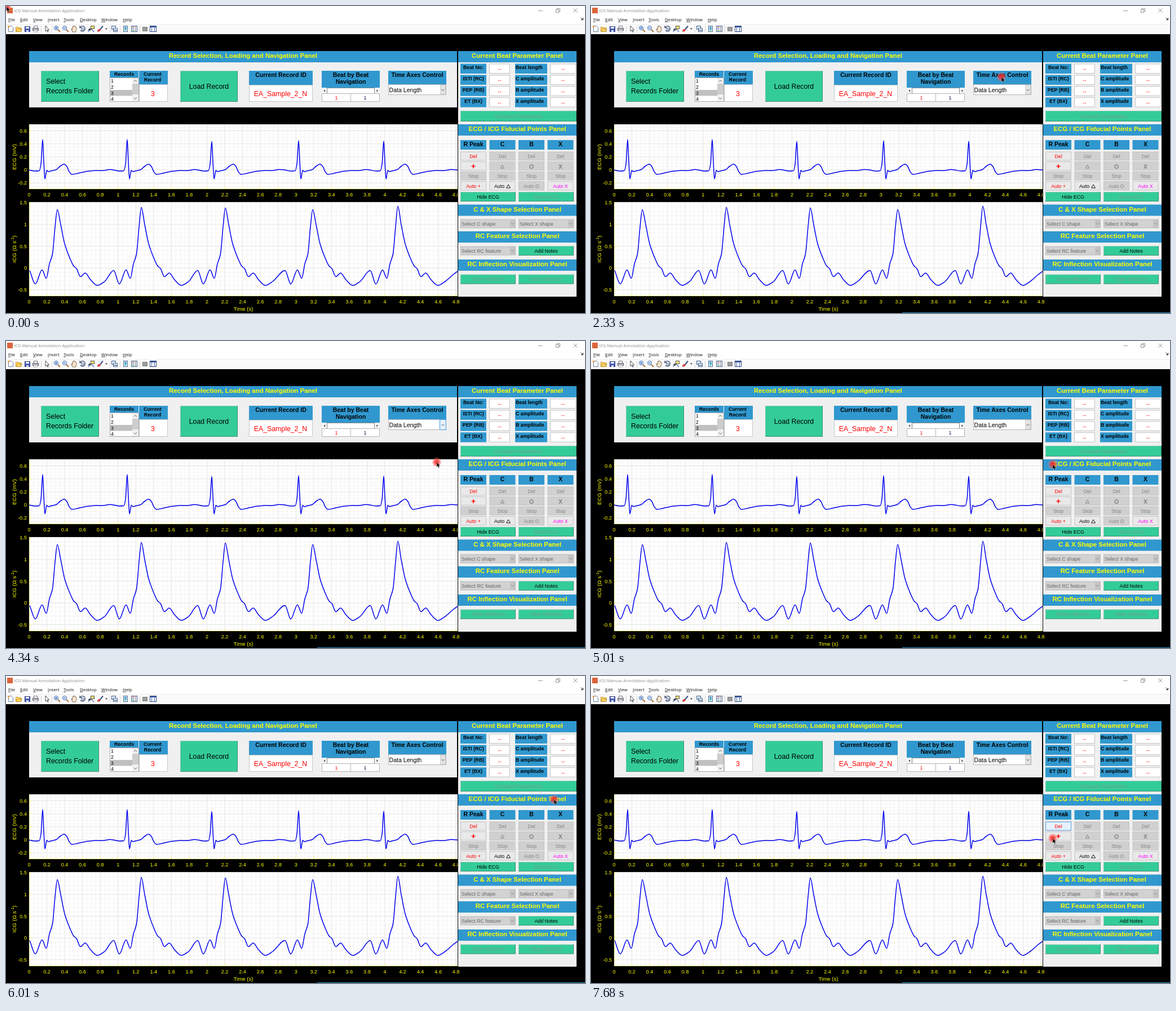
These frames come from a looping animation (1027x545 px, 8 s). An HTML page:

```html
<!DOCTYPE html>
<html lang="en">
<head>
<meta charset="utf-8">
<title>ICG Manual Annotation Application</title>
<style>
html, body { margin: 0; width: 100%; height: 100%; overflow: hidden; background: #000; }
svg { display: block; width: 1027px; height: 545px; }
text { font-family: "Liberation Sans", Arial, sans-serif; white-space: pre; }
.ui { font-family: "Open Sans", "Noto Sans", sans-serif; }
</style>
</head>
<body>
<svg id="stage" viewBox="0 0 1027 545" xmlns="http://www.w3.org/2000/svg"></svg>
<script>
const BLUE = '#3098cf', GREEN = '#33cc99', GRAY = '#f0f0f0', YELLOW = '#ffff00';
const RED = '#ff0000', DIM = '#838383', DIM_ON_GREEN = '#6f9f8b';
const out = [];
const add = s => out.push(s);

function rect(x1, y1, x2, y2, fill, extra = '') {
  add(`<rect x="${x1}" y="${y1}" width="${x2 - x1}" height="${y2 - y1}" fill="${fill}" ${extra}/>`);
}
function box(x1, y1, x2, y2, fill, stroke, extra = '') {
  rect(x1 + .5, y1 + .5, x2 - .5, y2 - .5, fill, `stroke="${stroke}" ${extra}`);
}
function path(d, stroke, width = 1, fill = 'none', extra = '') {
  add(`<path d="${d}" stroke="${stroke}" stroke-width="${width}" fill="${fill}" ${extra}/>`);
}
// y is the vertical middle of the capitals
function text(x, y, s, size, fill = '#000', anchor = 'middle', extra = '') {
  add(`<text x="${x}" y="${y + size * .36}" font-size="${size}" fill="${fill}" text-anchor="${anchor}" ${extra}>${s}</text>`);
}
const bold = (x, y, s, size, fill = '#000', anchor = 'middle') =>
  text(x, y, s, size, fill, anchor, 'font-weight="700"');

function button(x1, y1, x2, y2, label, color = '#000', fill = GREEN, size = 8.8) {
  box(x1, y1, x2, y2, fill, fill === GREEN ? '#7fc9ad' : '#c4c4c4');
  if (fill === GREEN) path(`M${x1} ${y2 - .5}H${x2 - .5}V${y1}`, '#3f8f74');
  if (label) text((x1 + x2) / 2, (y1 + y2) / 2, label, size, color);
}
function chevron(x, y, dir, color = '#555') {
  path(`M${x - 2.6} ${y - 1.3 * dir}L${x} ${y + 1.3 * dir}L${x + 2.6} ${y - 1.3 * dir}`, color);
}

/* window frame */
function menuBar() {
  rect(0, 0, 1027, 50, '#fff');
  rect(0, 32, 1027, 50, '#fafafa');
  path('M0 32.5H1027', '#ececec');
  rect(2, 3, 12, 13, '#d9653b');
  text(14, 8, 'ICG Manual Annotation Application', 7.7, '#8a8a8a', 'start', 'class="ui"');
  const menus = { File: 4, Edit: 25, View: 48, Insert: 74, Tools: 102, Desktop: 131, Window: 169, Help: 207 };
  for (const [name, x] of Object.entries(menus))
    text(x, 24, `<tspan text-decoration="underline">${name[0]}</tspan>${name.slice(1)}`, 7.7, '#111', 'start', 'class="ui"');
  path('M944 8.5H952M975.5 6.5H980.5V11.5H975.5ZM977 6V4.5H982.5V10H981M1006.5 4.5L1013.5 11.5M1013.5 4.5L1006.5 11.5', '#8c8c8c', .9);
  path('M1019.5 20.5L1023 24M1023.5 21V24.5H1020', '#222', 1);
}

function toolBar() {
  for (const x of [62, 81, 184, 202, 237]) path(`M${x}.5 35V47`, '#d4d4d4');
  path('M4.5 35.5H9.5L12.5 38.5V45.5H4.5Z', '#6a7f9b', 1, '#fff');
  rect(3, 35, 6, 38, '#f0a030');
  path('M17.5 45.5V37.5H21L22.5 38.5H26.5V45.5ZM17.5 45.5L20 40.5H28L26.5 45.5Z', '#b98a20', .8, '#ffd766');
  box(33, 36, 43, 46, '#4a5fb5', '#2b3a80');
  rect(35, 37, 41, 40, '#fff');
  rect(36, 43, 40, 46, '#d5d9ee');
  path('M49.5 39V35.5H55.5V39', '#777', 1, '#fff');
  box(47, 39, 58, 44, '#b9bcc2', '#5b5f68');
  rect(49, 43, 56, 46, '#fff', 'stroke="#777" stroke-width=".6"');
  path('M70 35V45L72.3 42.8L74 46.3L75.2 45.7L73.6 42.4H76.5Z', '#222', .8, '#fff');
  for (const [x, mark] of [[89, 'M87 39H91M89 37V41'], [104, 'M102 39H106']]) {
    path(`M${x + 3} 42L${x + 7} 46`, '#a9712f', 2);
    add(`<circle cx="${x}" cy="39" r="3.6" fill="#e2efff" stroke="#4a6fb0"/>`);
    path(mark, '#2454b0');
  }
  path('M118 46C117 43 115 41 116 40.3L118 42V37Q119 36 119.6 37V35.5Q120.6 34.6 121.4 35.5V36.4Q122.4 35.6 123.2 36.6V38Q124.5 37.4 125 38.5C125 42 124.5 43 123.5 46Z', '#5c4a36', .8, '#ffe8cf');
  path('M132 37.5A4.6 4.6 0 1 1 132 43M131 35V38.6H135', '#3b4d70', 1.3);
  path('M134 40L136 38.8L138.4 40V42.4L136 43.4L134 42.4Z', '#3b4d70', .7, '#cfd9ea');
  path('M146 46C147 40 149 38 156 46', '#3157a8', 1.2);
  box(150, 35, 157, 41, '#f4e66d', '#555');
  path('M146 42H151M148.5 39.5V44.5', '#222');
  path('M162 45Q163 41 166 41L168 43Q166 46 162 45Z', '#c03030', .6, '#e04848');
  path('M167 41.5L172 35.5', '#35508f', 2);
  path('M176 39.5H180L178 42Z', 'none', 0, '#333');
  box(187, 35, 195, 42, '#dfe9f6', '#46648f');
  box(190, 39, 198, 46, '#fff', '#46648f');
  path('M191 43H197', '#46648f', 1.5);
  box(208, 35, 216, 46, '#fff', '#46648f');
  rect(210, 37, 214, 44, 'url(#bar)');
  box(222, 35, 233, 46, '#fff', '#46648f');
  for (const [y, c] of [[38, '#d33'], [41, '#36c'], [44, '#393']]) {
    path(`M224 ${y - .5}H227`, c, 1.4);
    path(`M228 ${y - .5}H231`, '#666', 1);
  }
  box(242, 37, 251, 45, '#9b9b9b', '#858585');
  box(255, 35, 267, 46, '#fff', '#2d4478');
  rect(256, 36, 266, 38, '#3c5fa5');
  path('M258.5 38V45M263.5 38V45', '#3c5fa5');
}

/* charts */
// smooth curve without overshoot through points sorted by x
function curve(pts) {
  const n = pts.length, slope = [], m = [];
  for (let i = 0; i < n - 1; i++)
    slope.push((pts[i + 1][1] - pts[i][1]) / (pts[i + 1][0] - pts[i][0]));
  for (let i = 0; i < n; i++) {
    const a = slope[i - 1], b = slope[i];
    m.push(a === undefined ? b : b === undefined ? a : a * b <= 0 ? 0 : 2 * a * b / (a + b));
  }
  let d = `M${pts[0]}`;
  for (let i = 0; i < n - 1; i++) {
    const [x, y] = pts[i], [u, v] = pts[i + 1], h = (u - x) / 3;
    d += `C${x + h} ${y + m[i] * h} ${u - h} ${v - m[i + 1] * h} ${u} ${v}`;
  }
  return d;
}
const beats = (peaks, shape) =>
  peaks.flatMap(([px, py]) => shape.map(([dx, y]) => [px + dx, dx === 0 ? py : y]));

const X0 = 41, PER_SEC = 157.75, LEFT = 41, RIGHT = 801;

function plot(top, bottom, zero, perUnit, yStep, yMinor, yLabels, labelY) {
  rect(LEFT, top, RIGHT, bottom, '#fff');
  let minor = '', major = '', ticks = '';
  for (let i = 1; i * .05 * PER_SEC < RIGHT - X0; i++) {
    const x = X0 + i * .05 * PER_SEC;
    if (i % 4) minor += `M${x} ${top}V${bottom}`;
    else {
      major += `M${x} ${top}V${bottom}`;
      ticks += `M${x} ${bottom}v-5`;
    }
  }
  const perMajor = Math.round(yStep / yMinor);
  for (let i = -30; i < 30; i++) {
    const y = zero - i * yMinor * perUnit;
    if (y <= top || y >= bottom) continue;
    if (i % perMajor) minor += `M${LEFT} ${y}H${RIGHT}`;
    else {
      major += `M${LEFT} ${y}H${RIGHT}`;
      ticks += `M${LEFT} ${y}h6`;
    }
  }
  path(minor, '#dcdcdc', .7, 'none', 'stroke-dasharray="1 1.4"');
  path(major, '#e0e0e0', .9);
  path(ticks + `M${LEFT + .4} ${top}V${bottom - .4}H${RIGHT}`, '#f6f68a', .9);
  for (let i = 0; i <= 24; i++)
    text(X0 + i * .2 * PER_SEC, labelY, String(+(i * .2).toFixed(1)), 9.1, YELLOW);
  for (const v of yLabels) text(37, zero - v * perUnit, String(v), 9.1, YELLOW, 'end');
}

function charts() {
  plot(210, 325, 291, 115.8, .2, .05, [.6, .4, .2, 0, -.2], 335);
  plot(348, 515, 465, 77.3, .5, .1, [1.5, 1, .5, 0, -.5], 525);
  text(0, 0, 'ECG (mV)', 9.9, YELLOW, 'middle', 'transform="translate(14 268) rotate(-90)"');
  text(0, 0, 'ICG (Ω s<tspan dy="-4" font-size="7">-1</tspan><tspan dy="4">)</tspan>', 9.9, YELLOW, 'middle',
    'transform="translate(14 431.5) rotate(-90)"');
  text(421, 537.5, 'Time (s)', 9.7, YELLOW);

  const ecg = beats([[65, 237], [215, 237], [365, 240.5], [519, 239], [670, 240]], [
    [-25, 291], [-14, 293], [-6, 292.5], [-3, 281], [0, 0], [2, 276], [4, 307], [7.2, 291.8], [10, 294],
    [15, 292.8], [24, 290.5], [31, 284.5], [38, 280.8], [43, 285], [47, 294], [52, 299], [62, 297.2],
    [76, 294], [95, 292], [106, 292.3], [120, 290.2]
  ]);
  path(curve([...ecg, [801, 291]]), '#0000ee', 1.5, 'none', 'clip-path="url(#plots)"');

  const icg = beats([[91, 361.5], [240, 357.5], [389, 358.5], [544, 361.5], [695, 355.5]], [
    [-49, 469.5], [-39, 493.5], [-27, 468.5], [-19.5, 483.5], [-14, 458], [-8.5, 440], [-4, 392], [0, 0], [6, 388],
    [13, 422], [22, 447], [29, 461.5], [34, 466], [41, 480.5], [49.5, 474], [59, 486], [71, 496], [84, 489]
  ]);
  path(curve([...icg, [793, 477], [801, 471]]), '#0000ee', 1.5, 'none', 'clip-path="url(#plots)" stroke-linejoin="round"');
}

/* panels */
function header(x1, x2, y, title) {
  rect(x1, y, x2, y + 20, BLUE);
  bold((x1 + x2) / 2, y + 8, title, 11.45, YELLOW);
}

function recordPanel() {
  rect(41, 80, 800, 180, GRAY);
  header(41, 800, 80, 'Record Selection, Loading and Navigation Panel');
  button(62, 115, 165, 170);
  text(71, 134, 'Select', 12.3, '#000', 'start');
  text(71, 150.5, 'Records Folder', 12.3, '#000', 'start');
  button(309, 115, 411, 170, 'Load Record', '#000', GREEN, 12.3);

  rect(184, 115, 235, 127, BLUE);
  bold(209.5, 121, 'Records', 8.8);
  box(184, 127, 236, 170, '#fff', '#a8a8a8');
  rect(185, 149, 224, 159.5, '#c0c0c0');
  ['1', '2', '3', '4'].forEach((s, i) => text(186, 133.2 + i * 10.7, s, 8.8, '#000', 'start'));
  rect(224, 128, 235, 169, '#f0f0f0');
  rect(224, 138, 235, 157, '#cdcdcd');
  chevron(229.5, 133, -1);
  chevron(229.5, 164, 1);
  rect(236, 115, 287, 140, BLUE);
  bold(260, 121, 'Current', 8.8);
  bold(260, 131, 'Record', 8.8);
  box(236, 139, 287, 170, '#fff', '#c8c8c8');
  text(260.5, 155.5, '3', 12.3, RED);

  rect(431, 115, 544, 140, BLUE);
  bold(487.5, 122, 'Current Record ID', 10.5);
  box(431, 140, 544, 170, '#fff', '#c8c8c8');
  text(487, 155.5, 'EA_Sample_2_N', 12.3, RED);

  rect(560, 115, 663, 145, BLUE);
  bold(611.5, 122, 'Beat by Beat', 10.5);
  bold(611.5, 134.5, 'Navigation', 10.5);
  rect(560, 145, 663, 156, '#f4f4f4');
  box(569, 145, 654, 156, '#fff', '#888');
  path('M566 148.5V152.5L563.5 150.5ZM657.5 148.5V152.5L660 150.5Z', 'none', 0, '#333');
  box(560, 155, 612, 170, '#fff', '#b5b5b5');
  box(611, 155, 663, 170, '#fff', '#b5b5b5');
  text(586, 162.5, '1', 8.8, RED);
  text(637, 162.5, '1', 8.8, '#000050');

  rect(678, 115, 781, 140, BLUE);
  bold(729.5, 122, 'Time Axes Control', 10.5);
  box(678, 139, 781, 158, '#fff', '#b5b5b5');
  box(770, 140, 780, 157, '#e4e4e4', '#cfcfcf');
  box(769, 139, 781, 158, '#e5f1fb', '#4a9be0', 'id="comboHover"');
  chevron(775, 149, 1);
  text(679.5, 149, 'Data Length', 10.6, '#000', 'start');
}

function select(x, y, label) {
  box(x, y, x + 98, y + 16, '#d2d2d2', '#b9b9b9');
  rect(x + 88, y + 1, x + 97, y + 15, '#c4c4c4');
  chevron(x + 92.5, y + 8, 1, '#888');
  text(x + 2, y + 8, label, 8.9, '#666', 'start');
}

function sidePanel() {
  rect(801, 80, 802, 516, '#000');
  rect(802, 80, 1012, 516, GRAY);
  header(802, 1012, 80, 'Current Beat Parameter Panel');
  const rows = [['Beat No:', 'Beat length'], ['ISTI (RC)', 'C amplitude'], ['PEP (RB)', 'B amplitude'], ['ET (BX)', 'X amplitude']];
  rows.forEach(([a, b], i) => {
    const y = 102.5 + i * 19.9;
    rect(806, y, 852, y + 17.5, BLUE);
    rect(903, y, 960, y + 17.5, BLUE);
    bold(829, y + 6.2, a, 8.8);
    bold(904, y + 6.2, b, 8.8, '#000', 'start');
    for (const [x1, x2] of [[857, 894], [965, 1011]]) {
      rect(x1 + .5, y + .5, x2 - .5, y + 17, '#fff', 'stroke="#c4c4c4"');
      text((x1 + x2) / 2, y + 9.5, '--', 9.5, RED);
    }
  });
  button(806, 186, 1012, 205, 'Compute Parameters', DIM_ON_GREEN);

  header(802, 1012, 210, 'ECG / ICG Fiducial Points Panel');
  const cols = [806, 857.5, 909, 960.5];
  const ON = '#e9e9e9', OFF = '#d0d0d0';
  ['R Peak', 'C', 'B', 'X'].forEach((name, i) => {
    const x = cols[i], first = i === 0, mid = x + 23;
    rect(x, 238, x + 46, 255, BLUE);
    bold(mid, 245, name, 10.5);
    button(x, 258.5, x + 46, 274.5, '', '', first ? ON : OFF);
    if (first) box(x, 258.5, x + 46, 274.5, '#e5f1fb', '#5a9fdc', 'id="delHover"');
    text(mid, 266.8, 'Del', 8.8, first ? RED : DIM);
    button(x, 276, x + 46, 292, '', '', first ? ON : OFF);
    if (first) path(`M${mid - 3.5} 284.5H${mid + 3.5}M${mid} 281V288`, RED, 1.5);
    else if (i === 1) path(`M${mid - 3.2} 288H${mid + 3.2}L${mid} 282Z`, DIM, 1);
    else bold(mid, 285.5, i === 2 ? 'O' : 'X', 10.5, DIM);
    button(x, 293.5, x + 46, 309.5, 'Stop', DIM, OFF);
    button(x, 311, x + 46, 327.5, '', '', i === 2 ? OFF : ON);
    if (i === 1) {
      text(866, 320, 'Auto', 8.8, '#000', 'start');
      path('M887.5 323H894.5L891 317Z', '#000', .9);
    } else text(mid, 319.5, 'Auto ' + ['+', '', 'O', 'X'][i], 8.8, [RED, '', DIM, '#ff00ff'][i]);
  });
  button(806, 330, 904, 347, 'Hide ECG');
  button(909, 330, 1007, 347, 'Show ECG', DIM_ON_GREEN);

  header(802, 1012, 352.5, 'C &amp; X Shape Selection Panel');
  select(806, 378.5, 'Select C shape');
  select(909, 378.5, 'Select X shape');
  header(802, 1012, 400, 'RC Feature Selection Panel');
  select(806, 426.5, 'Select RC feature');
  button(909, 426, 1007, 443, 'Add Notes');
  header(802, 1012, 450, 'RC Inflection Visualization Panel');
  button(806, 476.5, 904, 493.5, 'Show Inflection', DIM_ON_GREEN);
  button(909, 476.5, 1007, 493.5, 'Clear Inflection', DIM_ON_GREEN);
}

function pointer() {
  add('<g id="pointer"><circle r="9" fill="url(#glow)"/>');
  path('M0 0V8.6L2 6.9L3.5 10.2L5 9.5L3.6 6.4H6.2Z', '#fff', .4, '#000');
  add('</g>');
}

add(`<defs>
<radialGradient id="glow"><stop offset="0" stop-color="#f01818" stop-opacity=".95"/>
<stop offset=".45" stop-color="#ff3030" stop-opacity=".75"/><stop offset=".8" stop-color="#ff6060" stop-opacity=".35"/>
<stop offset="1" stop-color="#ff8080" stop-opacity="0"/></radialGradient>
<linearGradient id="bar" x2="0" y2="1"><stop stop-color="#3a8fd8"/><stop offset="1" stop-color="#7fdcc0"/></linearGradient>
<clipPath id="plots"><path d="M41 210H801V325H41ZM41 348H801V515H41Z"/></clipPath></defs>`);
rect(0, 0, 1027, 545, '#000');
menuBar();
toolBar();
charts();
recordPanel();
sidePanel();
rect(552, 544, 1027, 545, '#2a8fc4', 'id="edge"');
pointer();
document.getElementById('stage').innerHTML = out.join('');

const LOOP = 8000;
const stops = [
  [0, 1, 1], [660, 606, 304], [1000, 691, 186], [1330, 714, 164], [1670, 722, 148], [2000, 692, 131],
  [2330, 728, 126], [2670, 768, 125], [3000, 692, 148], [3330, 724, 153], [3670, 763, 153], [4340, 764, 215],
  [4670, 789, 218], [5010, 819, 219], [5340, 872, 219], [5670, 926, 219], [6010, 972, 219], [6340, 926, 220],
  [6670, 862, 221], [7010, 789, 241], [7340, 816, 264], [7680, 819, 288]
];
const el = id => document.getElementById(id);
const [arrow, edge, comboHover, delHover] = ['pointer', 'edge', 'comboHover', 'delHover'].map(el);
const show = (node, on) => node.setAttribute('visibility', on ? 'visible' : 'hidden');

function draw(t) {
  const [, x, y] = stops.findLast(s => s[0] <= t);
  arrow.setAttribute('transform', `translate(${x} ${y})`);
  show(edge, t >= 330);
  show(comboHover, t >= 4340 && t < 4670);
  show(delHover, t >= 7340);
}
const start = performance.now();
function tick() {
  draw((performance.now() - start) % LOOP);
  requestAnimationFrame(tick);
}
draw(0);
requestAnimationFrame(tick);
</script>
</body>
</html>
```
